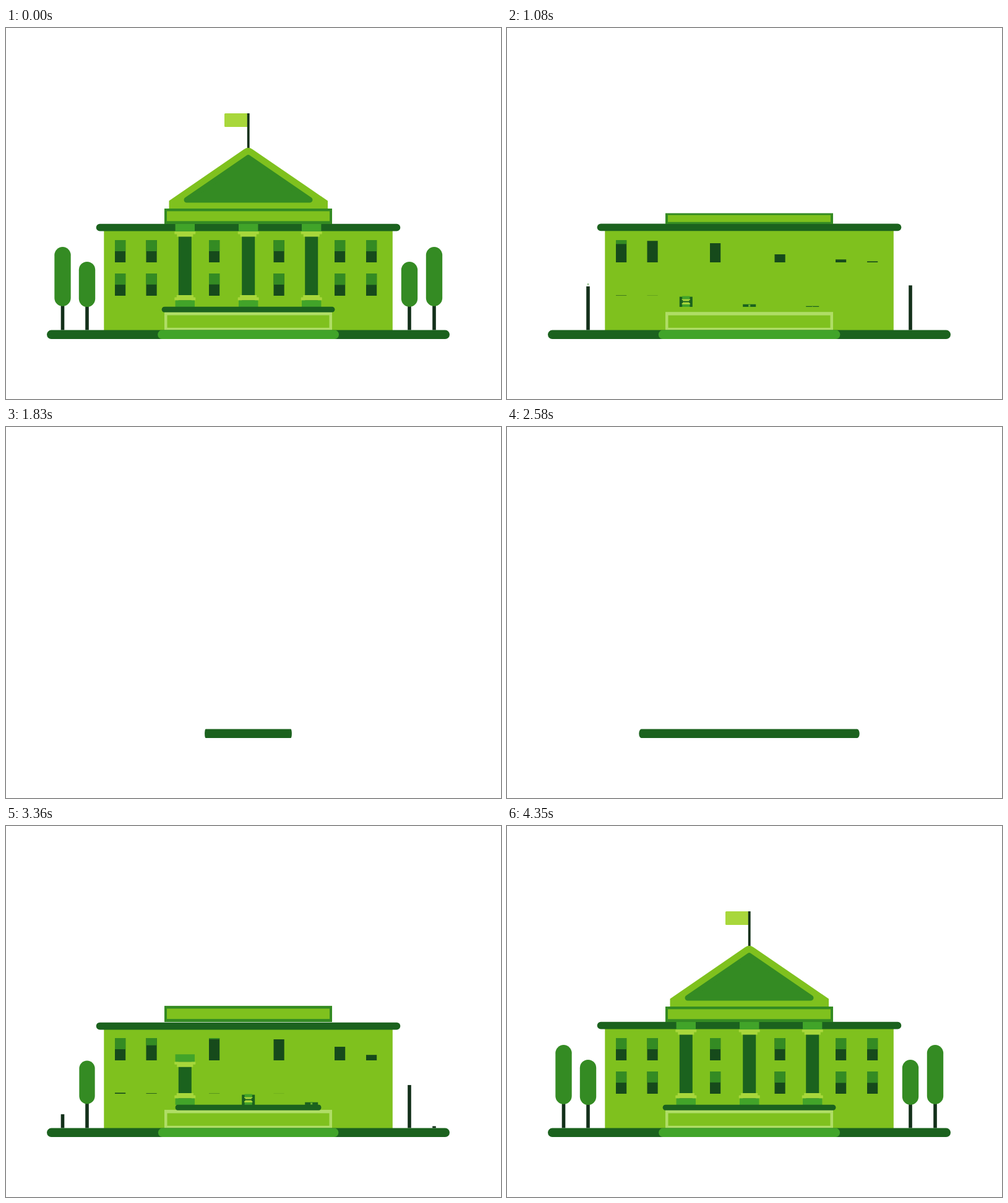
An HTML page for the animation above (4380 ms loop, 800 by 600 pixels).

```html
<!DOCTYPE html>
<html lang="en">
<head>
<meta charset="utf-8">
<title>Pop-up building</title>
<style>
  html, body { margin: 0; width: 100%; height: 100%; overflow: hidden; background: #fff; }
  svg { display: block; width: 800px; height: 600px; }
</style>
</head>
<body>
<svg id="stage" viewBox="0 0 800 600"></svg>
<script>
const LIME = '#7fc11e', DARK = '#1b621e', MID = '#348b23', STEP = '#41a429',
      PALE = '#a8d73b', TRIM = '#b0dd66', PANE = '#164a1b', POLE = '#13301a';
const STEP_MS = 30, HALF = 73, LOOP = STEP_MS * HALF * 2;

const stage = document.getElementById('stage');
const parts = [];

function add(parent, tag, attrs) {
  const el = document.createElementNS('http://www.w3.org/2000/svg', tag);
  for (const name in attrs) el.setAttribute(name, attrs[name]);
  parent.appendChild(el);
  return el;
}
const group = (parent = stage) => add(parent, 'g', {});
const box = (parent, x1, y1, x2, y2, fill, rx = 0) =>
  add(parent, 'rect', { x: x1, y: y1, width: x2 - x1, height: y2 - y1, fill, rx });

// Quick rise followed by a damped wobble.
const spring = (start, end, amp = 0.04) => k => {
  if (k <= start) return 0;
  if (k < end) {
    const x = (k - start) / (end - start);
    return x * x * (3 - 2 * x);
  }
  const s = k - end;
  return 1 + amp * Math.exp(-0.12 * s) * Math.sin(s * Math.PI / 5);
};

// Long, slow start with a late surge centred just after `mid`.
const SURGE = [[-11, 0], [-8, 0.01], [-6, 0.022], [-4, 0.045], [-2, 0.13],
               [0, 0.36], [2, 0.86], [3, 0.945], [5, 0.985], [7, 1]];
const surge = mid => k => {
  const r = k - mid;
  if (r <= SURGE[0][0]) return 0;
  for (let i = 1; i < SURGE.length; i++) {
    const [x0, y0] = SURGE[i - 1], [x1, y1] = SURGE[i];
    if (r < x1) return y0 + (y1 - y0) * (r - x0) / (x1 - x0);
  }
  return 1;
};

function scaleAt(el, cx, cy, sx, sy) {
  const shown = sx > 0.0005 && sy > 0.0005;
  el.setAttribute('display', shown ? 'inline' : 'none');
  if (shown) el.setAttribute('transform',
    `translate(${cx} ${cy}) scale(${sx} ${sy}) translate(${-cx} ${-cy})`);
}
const growX = (el, cx, ease) => parts.push(k => scaleAt(el, cx, 0, ease(k), 1));
const growY = (el, cy, ease) => parts.push(k => scaleAt(el, 0, cy, 1, ease(k)));

function tree(cx, top, bottom, trunkStart, crownStart, crownEnd) {
  growY(box(stage, cx - 2.8, 418, cx + 2.8, 488.5, POLE), 488.5,
        spring(trunkStart, trunkStart + 4));
  const crown = box(stage, cx - 13.2, top, cx + 13.2, bottom, MID, 13.2);
  const ease = spring(crownStart, crownEnd, 0.1);
  parts.push(k => {
    const p = ease(k);
    scaleAt(crown, cx, (top + bottom) / 2, Math.min(1, p), p);
  });
}

function windowAt(x, top, darkMid, blindStart) {
  growY(box(stage, x, top, x + 17.2, top + 36, PANE), top + 36, surge(darkMid));
  growY(box(stage, x, top, x + 17.2, top + 18, MID), top,
        spring(blindStart, blindStart + 5, 0.12));
}

function column(cx, mid) {
  const shaft = box(stage, cx - 10.5, 325, cx + 10.5, 451, DARK);
  const foot = group();
  box(foot, cx - 13.5, 432, cx + 13.5, 436.5, PALE);
  box(foot, cx - 17, 435.5, cx + 17, 440.5, PALE, 1);
  box(foot, cx - 15.7, 440.5, cx + 15.7, 451, STEP);
  const cap = group();
  box(cap, cx - 13, 332, cx + 13, 337.5, PALE);
  box(cap, cx - 17, 329, cx + 17, 333.5, PALE, 1);
  box(cap, cx - 15.7, 317, cx + 15.7, 329, STEP);
  const ease = surge(mid);
  parts.push(k => {
    const p = ease(k), open = Math.min(1, p * 3);
    scaleAt(shaft, cx, 451, 1, p);
    scaleAt(foot, cx, 451, open, open);
    scaleAt(cap, cx, 317, open, open);
    cap.setAttribute('transform',
      `translate(0 ${134 * (1 - p)}) ` + (cap.getAttribute('transform') || ''));
  });
}

// Flag, pole and pediment
growX(box(stage, 353, 138, 391.5, 160, PALE, 1.5), 391.5, spring(53, 57, 0.06));
growY(box(stage, 389.8, 138, 393.6, 292, POLE), 292, spring(43.5, 47, 0.07));

const roof = group();
add(roof, 'path', {
  d: 'M263.5 292V279.5L384.5 196Q391.5 191 398.5 196L520 279.5V292Z', fill: LIME
});
add(roof, 'path', {
  d: 'M292 278L391.5 209.5L491 278Z', fill: MID, stroke: MID,
  'stroke-width': 9, 'stroke-linejoin': 'round'
});
growY(roof, 292, spring(41.5, 44.7, 0.05));

// Wall and cornice
const wall = group();
box(wall, 158.3, 323, 624.8, 489, LIME);
box(wall, 145.7, 316.8, 637.3, 328.6, DARK, 5.9);
growY(wall, 489, spring(18.6, 21.5));

const frieze = group();
box(frieze, 256, 292, 527, 317, MID);
box(frieze, 260, 296.3, 523, 312.3, LIME);
growY(frieze, 317, spring(34.6, 36.8, 0.06));

[176, 226.5, 328, 432.5, 531, 582].forEach((x, i) => {
  windowAt(x, 343, 30 + 2 * i, 34 + 2 * i);
  windowAt(x, 397, 43 + 2 * i, 46 + 2 * i);
});

[289.3, 391.7, 493.7].forEach((cx, i) => column(cx, 38 + 3 * i));

// Trees
tree(131, 378, 451, 27.2, 35.5, 39.5);
tree(652, 378, 451, 28.8, 39, 43);
tree(91.5, 354, 450, 37.5, 42.5, 46.5);
tree(692, 354, 450, 38.5, 42.7, 46.7);

// Porch
const porch = group();
box(porch, 256, 459, 527, 489, TRIM);
box(porch, 260.5, 464.5, 522.5, 484.8, LIME);
growY(porch, 489, surge(30));
growX(box(stage, 251.8, 450.7, 531.3, 459.8, DARK, 4.5), 391.5, spring(36, 40));

// Ground and step
growX(box(stage, 66, 488.6, 717, 503, DARK, 7.2), 391.5, surge(12.25));
growX(box(stage, 245.2, 488.6, 538, 503, STEP, 7), 391.5, spring(18.8, 21.7, 0.036));

function frame() {
  const n = Math.floor((performance.now() % LOOP) / STEP_MS);
  const k = n < HALF ? HALF - 1 - n : n - HALF;
  for (const pose of parts) pose(k);
  requestAnimationFrame(frame);
}
frame();
</script>
</body>
</html>
```
